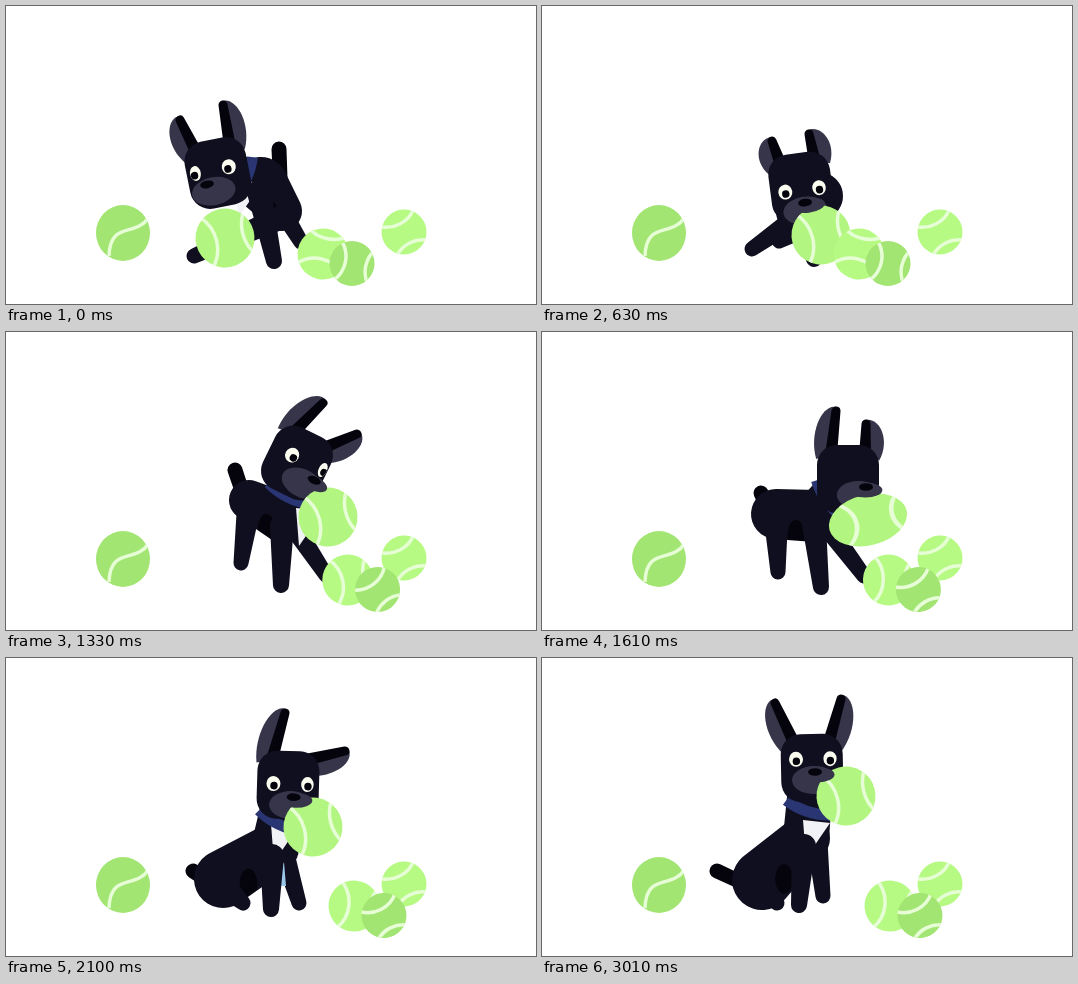
These frames come from a looping animation (530 px wide and 298 px high, 3.39 s). An HTML page with a canvas:

```html
<!DOCTYPE html>
<html lang="en">
<head>
<meta charset="utf-8">
<title>Dog with tennis balls</title>
<style>
html, body { margin: 0; width: 100%; height: 100%; overflow: hidden; background: #fff; }
canvas { display: block; }
</style>
</head>
<body>
<canvas id="stage" width="530" height="298"></canvas>
<script>
const ctx = document.getElementById('stage').getContext('2d');
const LOOP = 3390, STEP = 70, LAST = 3010, TAU = Math.PI * 2;
const COAT = '#100f1f', BLACK = '#05040d', GREY = '#36354a', BLUE = '#2a3674';
const SEAM = '#e6fdd6', LIME = '#b2f580', FRESH = '#b6fa83', OLD = '#a2e573';

// head: x, y, tilt; look: nose inside the head; chest and rump: circles;
// ears, tail and feet: end points; bib: tip and gap below; held: x, y, stretch
const poses = [
  { at: 0, head: [212, 167, -.2], look: [-13, 9], open: [1], earL: [174, 114], earR: [217, 99],
    chest: [255, 178, 27], rump: [276, 205, 20], tail: [273, 143],
    hind: [188, 250], near: [268, 255], far: [295, 236],
    bib: [232, 212, 0], held: [219, 232, 1], roll: [0] },
  { at: 630, head: [259, 181, -.13], look: [2, 16], open: [1], earL: [230, 135], earR: [267, 128],
    chest: [262, 205, 28], rump: [277, 190, 24], tail: [277, 190],
    hind: [210, 243], near: [272, 253], far: [237, 235],
    bib: [265, 215, 0], held: [279, 229, 1], roll: [0] },
  { at: 910, head: [309, 172, 0], look: [18, 12], open: [1], earL: [287, 103], earR: [332, 118],
    chest: [267, 178, 27], rump: [248, 171, 20], tail: [251, 135],
    hind: [234, 234], near: [269, 254], far: [302, 245],
    bib: [290, 217, 1], held: [330, 219, 1], roll: [.5] },
  { at: 1330, head: [291, 131, .45], look: [23, 8], open: [1], earL: [317, 71], earR: [351, 102],
    chest: [278, 186, 25], rump: [243, 168, 20], tail: [229, 138],
    hind: [235, 231], near: [275, 253], far: [320, 243],
    bib: [293, 214, 0], held: [322, 185, 1], roll: [.8] },
  { at: 1610, head: [306, 147, 0], look: [18, 8], open: [0], earL: [294, 79], earR: [324, 92],
    chest: [274, 184, 26], rump: [234, 182, 25], tail: [219, 161],
    hind: [236, 240], near: [279, 255], far: [322, 244],
    bib: [305, 200, 0], held: [326, 188, 1.35], roll: [.95] },
  { at: 2100, head: [282, 127, .03], look: [6, 12], open: [1], earL: [279, 55], earR: [339, 93],
    chest: [268, 190, 25], rump: [217, 221, 29], tail: [187, 213],
    hind: [237, 245], near: [265, 251], far: [293, 245],
    bib: [268, 204, 1], held: [307, 169, 1], roll: [1] },
  { at: 2700, head: [270, 110, -.02], look: [3, 4], open: [1], earL: [233, 45], earR: [299, 41],
    chest: [264, 180, 24], rump: [220, 222, 30], tail: [175, 213],
    hind: [235, 245], near: [257, 247], far: [281, 238],
    bib: [264, 200, 0], held: [304, 138, 1], roll: [1] }
];

const mix = (a, b, k) => a + (b - a) * k;

function poseAt(t) {
  let i = 0;
  while (i < poses.length - 2 && t >= poses[i + 1].at) i++;
  const a = poses[i], b = poses[i + 1];
  const u = Math.min(1, (t - a.at) / (b.at - a.at));
  const k = u * u * (3 - 2 * u);
  const pose = {};
  for (const part in a) {
    if (part !== 'at') pose[part] = a[part].map((v, n) => mix(v, b[part][n], k));
  }
  return pose;
}

// Outline around two circles
function limb(x1, y1, r1, x2, y2, r2, color = COAT) {
  const d = Math.max(.01, Math.hypot(x2 - x1, y2 - y1));
  const a = Math.atan2(y2 - y1, x2 - x1);
  const off = Math.acos(Math.max(-1, Math.min(1, (r1 - r2) / d)));
  ctx.beginPath();
  ctx.arc(x1, y1, r1, a + off, a - off + TAU);
  ctx.arc(x2, y2, r2, a - off, a + off);
  ctx.fillStyle = color;
  ctx.fill();
}

function triangle(x1, y1, x2, y2, x3, y3, color) {
  ctx.beginPath();
  ctx.moveTo(x1, y1);
  ctx.lineTo(x2, y2);
  ctx.lineTo(x3, y3);
  ctx.fillStyle = color;
  ctx.fill();
}

function oval(x, y, rx, ry, color, turn = 0) {
  ctx.beginPath();
  ctx.ellipse(x, y, rx, ry, turn, 0, TAU);
  ctx.fillStyle = color;
  ctx.fill();
}

// Draw inside the tilted head
function inHead([x, y, tilt], paint) {
  ctx.save();
  ctx.translate(x, y);
  ctx.rotate(tilt);
  paint();
  ctx.restore();
}

function ear([hx, hy, tilt], [tx, ty], side) {
  const c = Math.cos(tilt), s = Math.sin(tilt);
  const bx = hx + side * 19 * c + 24 * s, by = hy + side * 19 * s - 24 * c;
  const len = Math.hypot(bx - tx, by - ty);
  ctx.save();
  ctx.translate(tx, ty);
  ctx.rotate(Math.atan2(by - ty, bx - tx) - Math.PI / 2);
  ctx.beginPath();
  ctx.moveTo(0, -4);
  ctx.bezierCurveTo(side * 14, -6, side * 24, len * .55, side * 12, len + 6);
  ctx.lineTo(0, len);
  ctx.fillStyle = GREY;
  ctx.fill();
  limb(0, 0, 4.5, -side * 2, len, 6, BLACK);
  ctx.restore();
}

function collar([cx, cy], [hx, hy]) {
  ctx.save();
  ctx.translate(mix(cx, hx, .4), mix(cy, hy, .4));
  ctx.rotate(Math.atan2(hy - cy, hx - cx) + Math.PI / 2 + .2);
  ctx.beginPath();
  ctx.moveTo(-24, -3);
  ctx.quadraticCurveTo(0, 6, 24, -2);
  ctx.lineWidth = 11;
  ctx.strokeStyle = BLUE;
  ctx.stroke();
  ctx.restore();
}

function eye(side, [u, v], open) {
  const x = u * .4 + side * 17, y = v - 13;
  const rx = side * u > 0 ? 7 - Math.abs(u) / 8 : 7;
  ctx.save();
  oval(x, y, rx, 7.5 * open, '#fbfdf0');
  ctx.clip();
  oval(x + u / 10, y + 2, 3.7, 3.8, BLACK);
  ctx.restore();
}

function face(p) {
  const [u, v] = p.look;
  inHead(p.head, () => {
    ctx.beginPath();
    ctx.roundRect(-31, -34, 62, 68, 20);
    ctx.fillStyle = COAT;
    ctx.fill();
    eye(-1, p.look, p.open[0]);
    eye(1, p.look, p.open[0]);
    oval(u * .6, v + 8, 22, 14, GREY);
  });
}

function snout(p) {
  const [u, v] = p.look;
  inHead(p.head, () => {
    oval(u * .8 + 3, v + 3, 17, 7.5, GREY);
    oval(u, v, 7, 3.8, BLACK);
  });
}

// Two seam arcs curve away from each other
function ball(x, y, r, color, turn, stretch = 1, inner = -.3, outer = .62) {
  ctx.save();
  ctx.translate(x, y);
  ctx.rotate(turn);
  ctx.scale(stretch, 1 / Math.sqrt(stretch));
  oval(0, 0, r, r, color);
  ctx.clip();
  ctx.strokeStyle = SEAM;
  ctx.lineWidth = 3.5;
  for (const [side, at] of [[-1, inner], [1, outer]]) {
    ctx.beginPath();
    ctx.arc((at + side * 1.3) * r, 0, 1.3 * r, 0, TAU);
    ctx.stroke();
  }
  ctx.restore();
}

function leftBall() {
  ctx.save();
  oval(117, 227, 27, 28, OLD);
  ctx.clip();
  ctx.beginPath();
  ctx.moveTo(103, 250);
  ctx.bezierCurveTo(104, 214, 130, 232, 143, 211);
  ctx.lineWidth = 3.5;
  ctx.strokeStyle = SEAM;
  ctx.stroke();
  ctx.restore();
}

function dog(p) {
  const [cx, cy] = p.chest, [rx, ry] = p.rump, [hx, hy] = p.head, [bx, by, gap] = p.bib;
  limb(rx, ry + 12, 7, ...p.tail, 7.5, BLACK);
  limb(cx + 12, cy + 12, 10, ...p.far, 7.5);
  limb(...p.chest, ...p.rump);
  limb(cx, cy, 23, hx, hy, 22);
  ctx.globalCompositeOperation = 'source-atop';
  oval((cx + rx) / 2, (cy + ry) / 2 + 20, 9, 15, BLACK);
  ctx.globalCompositeOperation = 'source-over';
  triangle(bx + 10, by, bx + 10 + 2 * gap, by + 24 * gap, bx + 10 - 13 * gap, by + 24 * gap, '#9cc8e8');
  triangle(bx - 3, by - 38, bx + 24, by - 35, bx, by, '#f1f2f5');
  limb(rx, ry + 6, 12, ...p.hind, 7.5);
  limb(cx - 2, cy + 8, 12, ...p.near, 8);
  collar(p.chest, p.head);
  ear(p.head, p.earL, -1);
  ear(p.head, p.earR, 1);
  face(p);
}

function draw(t) {
  const p = poseAt(t), roll = p.roll[0], [x, y, stretch] = p.held;
  ctx.clearRect(0, 0, 530, 298);
  dog(p);
  leftBall();
  ball(398, 226, 22.5, FRESH, 1.1, 1, -.4, .55);
  ball(x, y, 29.5, LIME, -.25, stretch);
  snout(p);
  ball(317 + 31 * roll, 248, 25.5, FRESH, mix(-1.35, .1, roll), 1, -.2);
  ball(346 + 32 * roll, 257.5, 22.5, OLD, mix(.2, 1.1, roll));
}

const start = performance.now();
function tick() {
  const t = (performance.now() - start) % LOOP;
  draw(Math.min(LAST, Math.floor(t / STEP) * STEP));
  requestAnimationFrame(tick);
}
tick();
</script>
</body>
</html>
```
